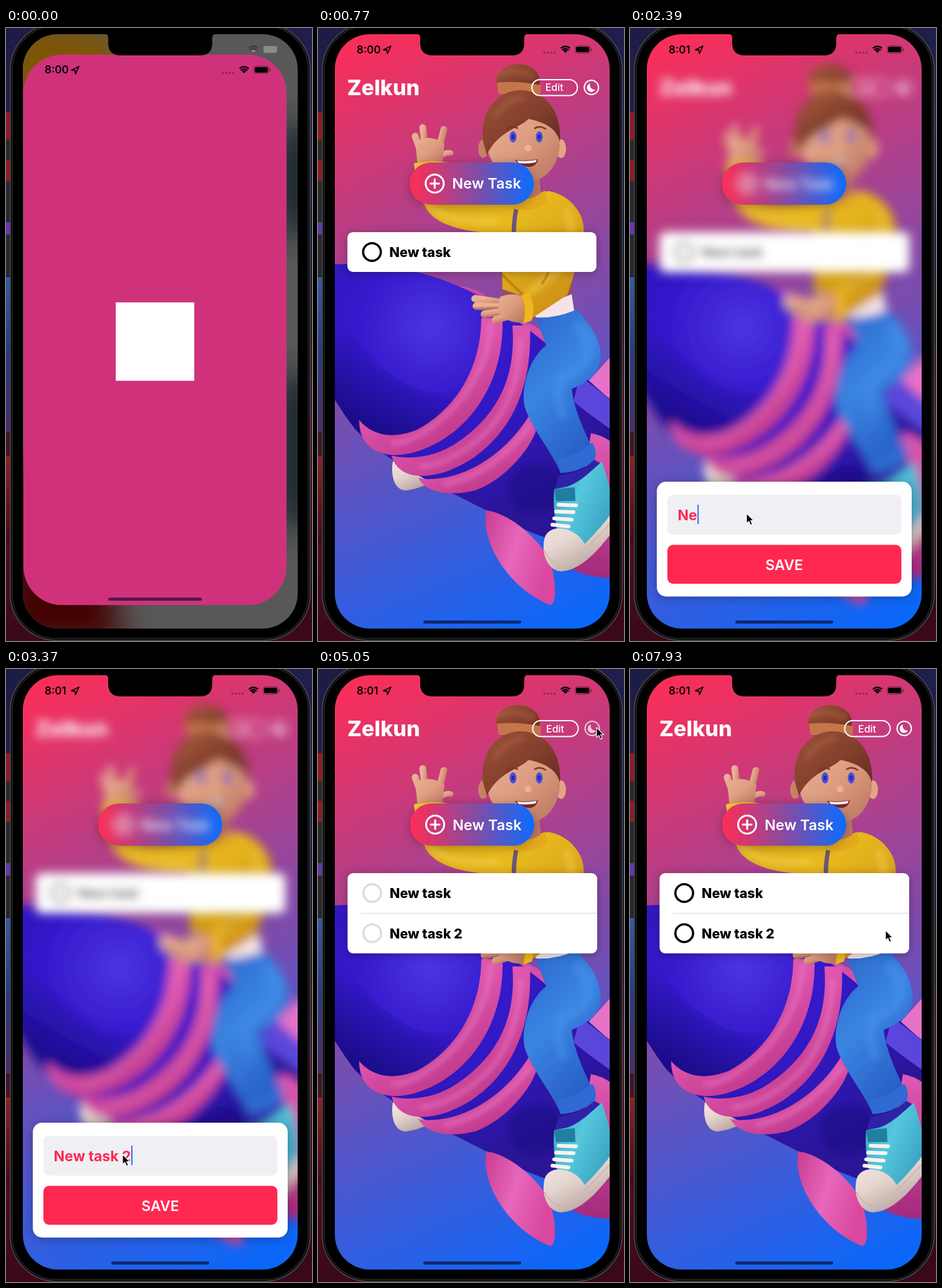
Animation of 491 by 985 pixels, one loop 8000 ms. Source, as an HTML page:

```html
<!DOCTYPE html>
<html lang="en">
<head>
<meta charset="utf-8">
<title>Task list</title>
<style>
html, body { margin: 0; width: 100%; height: 100%; overflow: hidden; background: #000; }
svg { display: block; width: 100vw; height: 100vh; }
text { font-family: Inter, "Open Sans", sans-serif; white-space: pre; }
.line { fill: none; stroke-linecap: round; stroke-linejoin: round; }
</style>
</head>
<body>
<svg viewBox="0 0 491 985">
<defs id="defs">
  <linearGradient id="sky" gradientUnits="userSpaceOnUse" x1="27" y1="10" x2="468" y2="965">
    <stop stop-color="#ff2d55"/><stop offset="1" stop-color="#0369ff"/>
  </linearGradient>
  <radialGradient id="hull" gradientUnits="userSpaceOnUse" cx="180" cy="480" r="330">
    <stop stop-color="#4c34e2"/><stop offset=".35" stop-color="#3519cc"/><stop offset=".65" stop-color="#2f17ba"/><stop offset="1" stop-color="#2a1596"/>
  </radialGradient>
  <linearGradient id="hullShade" gradientUnits="userSpaceOnUse" x1="150" y1="540" x2="90" y2="650">
    <stop stop-color="#160a80" stop-opacity="0"/><stop offset="1" stop-color="#160a80" stop-opacity=".85"/>
  </linearGradient>
  <filter id="soft" filterUnits="userSpaceOnUse" x="-20" y="-20" width="540" height="1030"><feGaussianBlur id="blur" stdDeviation="0"/></filter>
  <filter id="haze" x="-50%" y="-50%" width="200%" height="200%"><feGaussianBlur stdDeviation="26"/></filter>
  <filter id="glow" x="-50%" y="-50%" width="200%" height="200%"><feGaussianBlur stdDeviation="4"/></filter>
  <filter id="shadow" x="-20%" y="-40%" width="140%" height="180%"><feDropShadow dx="0" dy="2" stdDeviation="8" flood-opacity=".28"/></filter>
  <clipPath id="screen"><rect x="27" y="10" width="441" height="955" rx="56"/></clipPath>
  <clipPath id="titleClip"><rect id="titleBox" x="30" y="60" height="70"/></clipPath>
  <clipPath id="labelClip"><rect id="labelBox" x="150" y="216" height="68"/></clipPath>
  <clipPath id="rowClip"><rect id="rowBox" x="40" y="389" width="420"/></clipPath>
</defs>

<!-- desktop behind the phone -->
<rect width="491" height="985" fill="url(#desk)"/>
<path d="M0 135H7V250H0Z" fill="#8f1b25"/><path d="M0 312H7V332H0Z" fill="#6638a8"/>
<path d="M0 400H7V650H0Z" fill="url(#edge)"/><path d="M0 688H7V830H0Z" fill="url(#edgeRed)"/>
<path d="M0 180H7V212H0ZM0 246H7V312H0ZM0 333H7V398H0Z" fill="#29292b"/>
<rect x="7" y="-7" width="481" height="991" rx="74" stroke="#4b4b4e" stroke-width="1.6"/>
<rect x="10" y="-4" width="475" height="985" rx="71" fill="none" stroke="#202022" stroke-width="2"/>

<g clip-path="url(#screen)">
  <g id="home">
    <rect x="27" y="10" width="441" height="955" fill="#585858"/>
    <g filter="url(#haze)">
      <path d="M0 0H165L190 70 60 200H0Z" fill="#805500"/>
      <path d="M0 200H80V640H0Z" fill="#5a5050"/><path d="M0 700H120L190 990H0Z" fill="#420305"/>
      <path d="M430 160H500V330H430ZM430 560H500V800H430Z" fill="#15262c"/>
    </g>
    <g fill="#fff" opacity=".3"><use href="#wifi"/><rect x="413" y="29" width="22" height="11" rx="3"/></g>
  </g>

  <g id="app">
    <rect x="27" y="10" width="441" height="955" fill="url(#sky)"/>
    <g class="blurred">
      <!-- rocket -->
      <path d="M430 572 468 530 485 533V605Z" fill="#e672c8"/>
      <ellipse cx="242" cy="436" rx="40" ry="18" transform="rotate(18 242 436)" fill="#c94aa4"/>
      <path class="line" d="M322 482Q348 482 360 508" stroke="#d64fa6" stroke-width="20"/>
      <path d="M120 697C116 722 124 744 142 743Q160 741 182 730L150 690Z" fill="url(#cream)"/>
      <path d="M10 381C110 372 190 395 262 432 340 480 400 535 485 612V850C400 835 330 810 270 775 170 725 100 690 60 645 40 620 30 600 10 570Z" fill="url(#hull)"/>
      <path d="M10 430C120 600 200 610 262 560L180 660Q110 680 60 645 40 620 10 570Z" fill="url(#hullShade)"/>
      <path d="M420 560Q450 580 485 612V655Q440 625 410 600Z" fill="#5b46dc"/>
      <ellipse cx="350" cy="740" rx="45" ry="40" fill="#1d0c86" opacity=".6" filter="url(#glow)"/>
      <path d="M270 775C260 825 305 900 372 927 386 926 380 875 370 850 345 812 305 780 270 775Z" fill="url(#fin)"/>
      <path d="M438 651Q465 656 485 678V884C450 885 420 878 400 866Z" fill="url(#finDark)"/>
      <g fill="url(#ring)">
        <path d="M66 630C66 680 108 693 150 683 232 662 300 580 296 466H262C262 540 226 610 160 645 122 661 88 656 66 630Z"/>
        <path d="M118 687C128 725 172 724 205 713 290 682 346 600 340 478H312C318 560 290 620 225 665 192 688 152 695 118 687Z"/>
        <path d="M161 723C176 752 225 751 255 742 302 724 346 672 353 636L345 612C325 650 285 695 230 715 206 724 180 727 161 723Z"/>
      </g>
      <g class="line" stroke-width="6" stroke="#f58bd0" opacity=".55" filter="url(#glow)">
        <path d="M120 667C150 668 200 635 235 590 262 550 276 515 277 475"/>
        <path d="M165 704C205 703 260 668 290 625 315 585 324 545 325 500"/>
        <path d="M205 732C250 725 295 695 340 640"/>
      </g>
      <!-- leg and shoe -->
      <path d="M350 466 414 452C440 478 456 506 453 532 450 562 420 574 407 580 412 620 430 650 445 688L389 714C375 680 340 640 331 606 326 574 340 530 366 510Z" fill="url(#jean)"/>
      <path d="M418 480C446 510 436 545 400 558 380 570 385 590 392 620" class="line" stroke="#519bf0" stroke-width="18" opacity=".35" filter="url(#glow)"/>
      <path d="M384 692Q414 688 440 666 449 680 444 694 420 714 389 715Z" fill="#2f6bd2"/>
      <path d="M386 719Q420 716 443 694L455 700Q440 725 400 742L381 740Z" fill="#3022a8"/>
      <path d="M379 741 399 737C420 731 440 710 455 697 465 720 474 760 472 790L430 830 385 812Q376 775 379 741Z" fill="url(#teal)"/>
      <path d="M379 741 412 738 413 760 382 760Z" fill="#207fa0"/>
      <path d="M364 818C372 796 412 800 428 829 442 815 458 798 472 778V810C448 842 420 872 390 873 368 872 357 843 364 818Z" fill="url(#cream)"/>
      <path d="M363 840Q378 868 400 860 432 838 472 792" class="line" stroke="#c9b9b4" stroke-width="2"/>
      <path d="M386 766 414 767M382 777 410 778M379 788 407 790M376 798 402 801" class="line" stroke="#fff1ed" stroke-width="6"/>
      <!-- raised hand -->
      <g class="line" stroke="url(#skin)" stroke-width="11">
        <path d="M165 200 156 174"/><path d="M173 195 168 160"/><path d="M184 195 184 154"/><path d="M194 195 202 163"/><path d="M195 207Q205 199 213 201" stroke-width="9"/>
      </g>
      <path d="M156 182Q180 170 203 186L199 222 160 222Z" fill="url(#skin)"/>
      <!-- torso -->
      <path d="M293 330 410 340 408 452Q380 468 330 462L294 430Z" fill="#925068"/>
      <path d="M340 452 407 428 411 454Q380 467 350 465Z" fill="#f4e4e7"/>
      <path d="M154 217Q186 210 214 217L218 280Q265 284 322 270L370 262C405 268 430 300 426 330 420 372 408 405 400 429L330 475Q320 450 326 430L296 420 294 329C240 330 190 318 174 290 162 268 157 242 154 217Z" fill="url(#coat)"/>
      <path d="M154 218Q186 211 214 218L215 228Q186 222 156 231Z" fill="#f7cf3c"/>
      <path d="M178 285Q210 315 285 310M400 296Q418 340 384 390L340 424" class="line" stroke="#f7d552" stroke-width="14" opacity=".4" filter="url(#glow)"/>
      <path d="M374 330Q382 380 360 410M294 395 330 430" class="line" stroke="#a36310" stroke-width="4" opacity=".5"/>
      <path d="M322 275Q314 300 314 335" class="line" stroke="#6c5578" stroke-width="7"/>
      <path d="M326 430Q336 450 330 475L343 470Q350 448 338 424Z" fill="#efb621"/>
      <g class="line" stroke="url(#skin)" stroke-width="12">
        <path d="M305 443 252 435"/><path d="M300 449 254 447"/><path d="M305 455 267 460"/><path d="M312 461 285 469"/>
      </g>
      <path d="M292 432Q315 424 328 432 332 450 329 473 305 476 288 455Z" fill="url(#skin)"/>
      <!-- head -->
      <path d="M318 235H355L358 272Q335 288 315 272Z" fill="#bd7763"/>
      <path d="M312 266Q335 285 364 261L368 280Q340 300 313 290Z" fill="#e5a91d"/>
      <ellipse cx="265" cy="194" rx="8" ry="15" fill="#c98164"/><ellipse cx="390" cy="194" rx="8" ry="15" fill="#e3a484"/>
      <path d="M270 160Q310 110 386 150L388 190C384 228 360 247 335 247 300 246 276 222 271 190Z" fill="url(#skin)"/>
      <ellipse cx="321" cy="85" rx="35" ry="27" fill="url(#hair)"/>
      <path d="M287 88Q320 84 358 92L357 106H290Z" fill="#c4764b"/>
      <path d="M265 183C259 130 290 100 326 100 366 101 392 135 388 183 384 163 366 152 338 146 322 162 288 166 271 204Z" fill="url(#hair)"/>
      <path d="M288 75Q315 63 345 78M285 142Q300 115 328 113" class="line" stroke="#b56a4b" stroke-width="8" opacity=".5" filter="url(#glow)"/>
      <g fill="#4650df"><ellipse cx="313" cy="175" rx="5.5" ry="9"/><ellipse cx="355" cy="175" rx="5.5" ry="9"/></g>
      <g fill="#2a2a9c"><ellipse cx="313" cy="175" rx="2.5" ry="4"/><ellipse cx="355" cy="175" rx="2.5" ry="4"/></g>
      <path d="M303 162Q311 156 320 161M348 161Q356 156 365 162" class="line" stroke="#743626" stroke-width="2.5"/>
      <ellipse cx="337" cy="193" rx="6" ry="5" fill="#f0b193"/>
      <path d="M316 212Q335 214 353 211 350 224 337 223 322 222 316 212Z" fill="#7b2431"/>
      <path d="M319 213Q335 215 351 212L349 216Q335 219 322 217Z" fill="#fff"/>
    </g>

    <g class="blurred">
      <g id="title" clip-path="url(#titleClip)"><text x="47" y="108" font-size="34" font-weight="800" fill="#fff">Zelkun</text></g>
      <g id="tools" class="line" stroke="#fff" stroke-width="2">
        <rect x="344.5" y="83" width="73" height="25.5" rx="12.75"/>
        <text x="366" y="101.5" font-size="16" font-weight="500" fill="#fff" stroke="none">Edit</text>
        <g id="moon"><circle id="disc" cx="440" cy="95.5" r="11.5"/><path id="crescent" d="M438 89A7 7 0 1 0 446 99 7.500 7.500 0 0 1 438 89Z" stroke="none"/></g>
      </g>
    </g>
    <g id="button">
      <rect id="capsule" x="148" y="216" height="68" rx="34" fill="url(#pill)" filter="url(#shadow)"/>
      <g class="blurred"><g id="label" clip-path="url(#labelClip)">
        <path d="M181 250H195M188 243V257" class="line" stroke="#fff" stroke-width="3"/><circle cx="188" cy="250" r="14.5" class="line" stroke="#fff" stroke-width="3"/>
        <text x="216" y="258.500" font-size="23.500" font-weight="600" fill="#fff">New Task</text>
      </g></g>
    </g>
    <g class="blurred"><g id="list">
      <rect id="card" x="47.5" y="328" rx="9" filter="url(#shadow)"/>
      <g class="row"><circle class="check" cx="87" cy="360" r="14.2"/><text x="115" y="368" font-size="21.5" font-weight="800">New task</text></g>
      <g clip-path="url(#rowClip)">
        <path id="rule" d="M68 392.500H448" stroke="#dadade"/>
        <g class="row" id="second"><circle class="check" cx="87" cy="424.500" r="14.2"/><text x="115" y="432.500" font-size="21.5" font-weight="800">New task 2</text></g>
      </g>
    </g></g>

    <g id="sheet">
      <rect x="43" y="729" width="409" height="184.500" rx="15" fill="#fff" filter="url(#shadow)"/>
      <rect x="60" y="750" width="375.500" height="64" rx="9" fill="#efeff4"/>
      <text id="entry" x="76.5" y="791" font-size="23"/>
      <rect id="caret" y="766" width="2" height="31" fill="#2f6fe8"/>
      <rect id="save" x="60" y="830.500" width="375.500" height="62.500" rx="9"/>
      <text x="247.500" y="870.500" text-anchor="middle" font-size="23" font-weight="600" fill="#fff">SAVE</text>
    </g>
  </g>

  <g id="splash"><rect id="panel" fill="#cf327b"/><rect id="mark" width="126" height="126" fill="#fff"/></g>

  <g id="status">
    <text id="clock" x="62" y="40.500" font-size="17" font-weight="600"/>
    <path d="M105 35 117 29 111.500 41 110.500 35.500Z" class="line" stroke="#000" stroke-width="1.8"/>
    <g id="signals">
      <path d="M363 39.500H383" stroke="#000" stroke-opacity=".3" stroke-width="3.500" stroke-linecap="round" stroke-dasharray="0 5.500"/>
      <g id="wifi"><path d="M397 40 393.500 36.500Q397 34 400.500 36.500Z"/><path d="M389.500 32.500Q397 26.500 404.500 32.500M391.500 35.500Q397 31 402.500 35.500" fill="none" stroke="currentColor" stroke-width="2.2"/></g>
      <rect x="412.500" y="28.500" width="24" height="12" rx="3.500" fill="none" stroke="#000" stroke-opacity=".4"/>
      <rect x="414" y="30" width="21" height="9" rx="2"/><path d="M438.500 32.500V37" stroke="#000" stroke-opacity=".4" stroke-width="2"/>
    </g>
  </g>
  <rect id="bar" height="5" rx="2.500" fill="#0a0a2a" opacity=".65"/>
</g>
<path d="M158 9Q164 10 164 16V24Q164 44 184 44H311Q331 44 331 24V16Q331 10 337 9Z"/>
<path id="pointer" d="M0 0V16L3.700 12.600 6.500 18.800 9.300 17.600 6.600 11.500H11.500Z" fill="#000" stroke="#fff" stroke-width="1.1"/>
</svg>

<script>
const $ = id => document.getElementById(id);
const all = selector => document.querySelectorAll(selector);
const set = (el, attrs) => { for (const k in attrs) el.setAttribute(k, attrs[k]); };
const lerp = (a, b, p) => a + (b - a) * p;
const smooth = (t, a, b) => { const p = Math.min(1, Math.max(0, (t - a) / (b - a))); return p * p * (3 - 2 * p); };
const pulse = (t, a, b, c, d) => smooth(t, a, b) - smooth(t, c, d);
const mix = (a, b, p) => `rgb(${a.map((v, i) => Math.round(lerp(v, b[i], p)))})`;
const shift = (x, y) => ({ transform: `translate(${x} ${y})` });
const visible = on => ({ visibility: on ? 'visible' : 'hidden' });

const BLACK = [0, 0, 0], WHITE = [255, 255, 255], DARK = [28, 28, 30], PINK = [255, 40, 80], BLUE = [0, 105, 255];
const TYPED = 'New task 2', SAVED = 3760;

// id: [x2, y2, ...colours]
const ramps = {
  desk: [.1, 1, '#1d1c44', '#232057', '#1a1630', '#541326', '#3a0818'],
  edge: [0, 1, '#375a9c', '#293b7d', '#4b2a66'],
  edgeRed: [0, 1, '#8d2026', '#3f0c19'],
  pill: [1, 0, '#ff2d55', '#8a4aa0', '#0a6cff'],
  skin: [1, 1, '#e9b196', '#dc9b7e', '#b8725e'],
  hair: [1, 1, '#9c5138', '#84402c', '#5c271f'],
  coat: [.9, 1, '#d9a41f', '#e8b91d', '#c98a14'],
  jean: [.5, 1, '#2b63c8', '#3a85e2', '#285fc6'],
  ring: [.7, 1, '#e25fb6', '#dd55ad', '#b93383'],
  fin: [1, .4, '#c93c92', '#e667bb', '#d9479f'],
  finDark: [0, 1, '#e05ab2', '#a32a7c'],
  teal: [1, .6, '#2f9fc0', '#55c7dd', '#3aa4c4'],
  cream: [.6, 1, '#f4e9e6', '#e6d6d0', '#b9a39f']
};
$('defs').insertAdjacentHTML('beforeend', Object.entries(ramps).map(([id, [x, y, ...colours]]) =>
  `<linearGradient id="${id}" x2="${x}" y2="${y}">` +
  colours.map((c, i) => `<stop offset="${i / (colours.length - 1)}" stop-color="${c}"/>`).join('') +
  '</linearGradient>').join(''));

// [time, x, y]
const route = [
  [1000, 330, 440], [1450, 255, 256], [1750, 255, 256], [2120, 187, 780], [3400, 187, 780],
  [3680, 208, 857], [4150, 208, 857], [4850, 447, 94], [6500, 447, 94],
  [7050, 320, 352], [7450, 414, 392], [7750, 410, 420], [8000, 410, 420]
];

function drawLaunch(t) {
  const p = 1 - (1 - Math.min(1, t / 330)) ** 3;
  const x = lerp(28, 27, p), y = lerp(43, 10, p), w = lerp(422, 441, p), h = lerp(884, 955, p);
  set($('panel'), { x, y, width: w, height: h, rx: lerp(62, 56, p) });
  set($('mark'), { x: x + w / 2 - 63, y: lerp(441, 430, p) });
  set($('splash'), { opacity: 1 - smooth(t, 340, 550) });
  set($('home'), visible(t < 335));
  set($('app'), visible(t >= 335));
  set($('status'), shift(0, 33 * (1 - p)));
  set($('signals'), shift(-15 * (1 - p), 0));
  set($('bar'), { x: lerp(164, 169, p), y: lerp(915, 952, p), width: lerp(150, 157, p) });
  $('clock').textContent = t < 1000 ? '8:00' : '8:01';
}

function drawLayout(t) {
  const open = smooth(t, 490, 800), back = 1 - open;
  set($('title'), shift(-13 * back, 2 * back));
  set($('titleBox'), { width: lerp(120, 300, open) });
  set($('tools'), shift(-53 * back, -back));
  set($('button'), shift(-30 * back, -2 * back));
  set($('capsule'), { width: lerp(193, 199, open) });
  set($('labelBox'), { width: lerp(171, 197, open) });
  set($('label'), { opacity: 1 - .18 * pulse(t, 1530, 1600, 1680, 1760) });
  set($('list'), shift(-16 * back, -2 * back));
  set($('card'), { x: lerp(51, 47.5, open), width: lerp(360, 400.5, open) });
}

function drawList(t) {
  const grow = smooth(t, SAVED, SAVED + 200);
  const dark = pulse(t, 5070, 5250, 6220, 6400), ring = pulse(t, 4970, 5075, 6220, 6400);
  set($('card'), { height: 64 + 65 * grow, fill: mix(WHITE, DARK, dark) });
  set($('rowBox'), { height: 3 + 65 * grow });
  set($('second'), { ...shift(0, -55 * (1 - grow)), ...visible(grow > 0 && t > 335) });
  set($('rule'), { opacity: smooth(t, 3900, 3980) * (1 - .75 * dark) });
  all('.row text').forEach(el => set(el, { fill: mix(BLACK, WHITE, dark) }));
  all('.check').forEach(el => set(el, { fill: 'none', 'stroke-width': 3.6, stroke: mix(BLACK, WHITE, ring) }));
  set($('disc'), { fill: dark > .5 ? '#fff' : 'none' });
  set($('crescent'), { fill: dark > .5 ? '#a2407f' : '#fff' });
  set($('moon'), { opacity: 1 - .28 * (pulse(t, 4940, 5000, 5070, 5180) + pulse(t, 6100, 6150, 6210, 6300)) });
}

function drawSheet(t) {
  const shown = pulse(t, 1700, 1950, SAVED, SAVED + 210);
  const radius = 8 * pulse(t, 1700, 1950, SAVED - 20, SAVED + 190);
  set($('blur'), { stdDeviation: radius });
  all('.blurred').forEach(el => radius > .05 ? el.setAttribute('filter', 'url(#soft)') : el.removeAttribute('filter'));
  all('#sheet > *').forEach(el => set(el, { opacity: shown }));

  const count = t < SAVED ? Math.max(0, Math.min(TYPED.length, Math.floor((t - 2115) / 125))) : 0;
  const entry = $('entry');
  entry.textContent = count ? TYPED.slice(0, count) : 'New Task';
  set(entry, { fill: count ? '#ff2850' : '#b9b9c2', 'font-weight': count ? 700 : 600 });
  set($('caret'), {
    x: count ? 77 + entry.getComputedTextLength() : 77,
    ...visible(t > 2120 && t < SAVED)
  });
  set($('save'), { fill: mix(BLUE, PINK, pulse(t, 2240, 2340, SAVED, SAVED + 300)) });
}

function drawPointer(t) {
  const i = route.findIndex(stop => stop[0] > t) || 1;
  const [t0, x0, y0] = route[i - 1], [t1, x1, y1] = route[i];
  const p = smooth(t, t0, t1);
  set($('pointer'), { ...shift(lerp(x0, x1, p), lerp(y0, y1, p)), ...visible(t >= 1000) });
}

function frame() {
  const t = performance.now() % 8000;
  [drawLaunch, drawLayout, drawList, drawSheet, drawPointer].forEach(draw => draw(t));
  requestAnimationFrame(frame);
}
frame();
</script>
</body>
</html>
```
